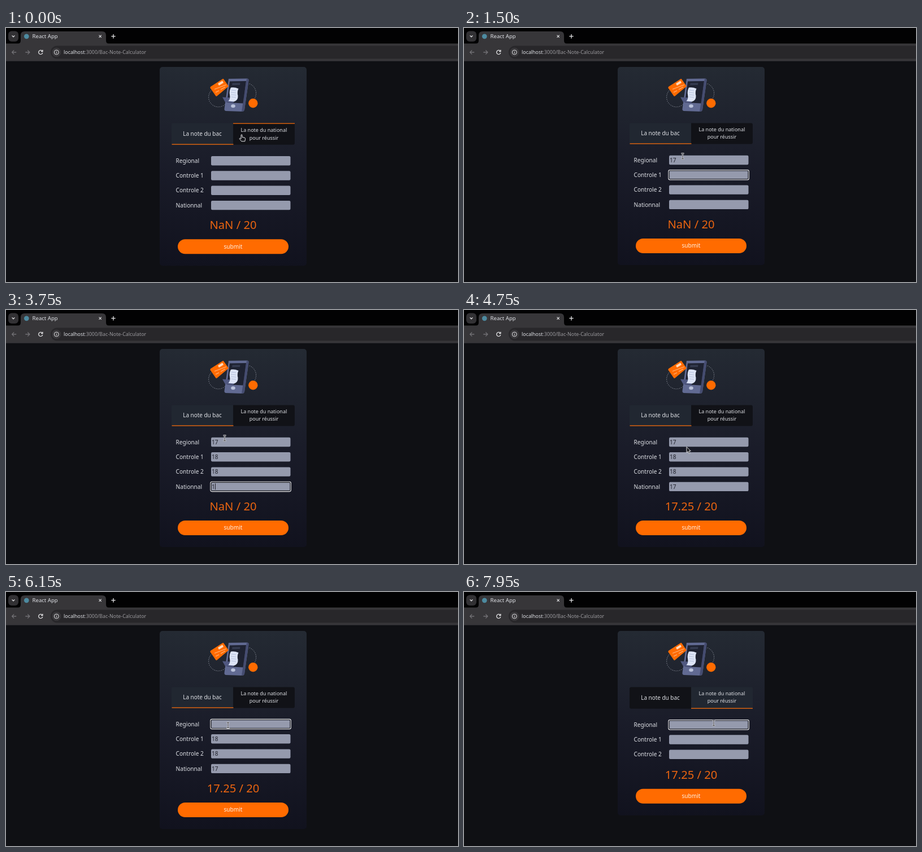
Write an HTML page that moves like this. It is 800 px wide and 450 px high and loops after 8 s.

```html
<!DOCTYPE html>
<html lang="fr">
<head>
<meta charset="utf-8">
<title>Bac Note Calculator</title>
<style>
  html, body { margin: 0; width: 100%; height: 100%; overflow: hidden; background: #0f1014; }
  svg { display: block; width: 100%; height: 100%; }
  text { font: 10.1px "Noto Sans", "Open Sans", sans-serif; fill: #dfe1e6; white-space: pre; }
  .mid { text-anchor: middle; }
  .small { font-size: 9px; }
  .line { fill: none; stroke-width: 1.3; }
  .cursor { fill: #17181c; stroke: #e4e4e8; stroke-width: 1; stroke-linejoin: round; }
</style>
</head>
<body>
<svg viewBox="0 0 800 450">
  <defs>
    <linearGradient id="cardFill" x2="0" y2="1">
      <stop stop-color="#242a33"/>
      <stop offset=".5" stop-color="#1a1c29"/>
      <stop offset="1" stop-color="#11121e"/>
    </linearGradient>
  </defs>
  <rect width="800" height="450" fill="#0f1014"/>

  <!-- browser bar -->
  <rect width="800" height="28" fill="#020203"/>
  <rect y="27.5" width="800" height="30" fill="#373639"/>
  <rect y="57.5" width="800" height="1" fill="#4a494c"/>
  <path d="M20 28Q26 28 26 22V13Q26 6 33 6H170Q177 6 177 13V22Q177 28 183 28Z" fill="#373639"/>
  <rect x="4" y="5.5" width="18" height="18.5" rx="6" fill="#323134"/>
  <g class="line" stroke="#e6e6e8">
    <path d="M10.6 13.4L13 15.8L15.4 13.4"/>
    <path d="M164.6 12.6L168.8 16.8M168.8 12.6L164.6 16.8" stroke-width="1.1"/>
    <path d="M190 11V18.4M186.3 14.7H193.7"/>
    <path d="M64 40.6A3.6 3.6 0 1 0 64.8 43.8M64.9 38.8V41.6H62"/>
  </g>
  <g class="line" stroke="#737276">
    <path d="M18.2 43H10.8M14.2 39.4L10.6 43L14.2 46.6"/>
    <path d="M34.3 43H41.7M38.3 39.4L41.9 43L38.3 46.6"/>
  </g>
  <circle cx="36.3" cy="14.8" r="4.4" fill="#4d8aa0"/>
  <text x="46.5" y="18" style="font-size:9.6px">React App</text>
  <rect x="79" y="31.5" width="740" height="23" rx="11.5" fill="#28272a"/>
  <circle cx="89.3" cy="43" r="8" fill="#39383b"/>
  <circle cx="89.3" cy="43" r="4" class="line" stroke="#dcdcdf" style="stroke-width:1"/>
  <path d="M89.3 42.4V45.2M89.3 40.6V41.5" class="line" stroke="#dcdcdf" style="stroke-width:1"/>
  <text x="102" y="46.2" style="font-size:8.85px">localhost<tspan fill="#9a999d">:3000/Bac-Note-Calculator</tspan></text>

  <rect id="card" x="272" y="69" width="260" height="351" rx="5" fill="url(#cardFill)"/>

  <!-- phone, receipt and payment card -->
  <g class="line" stroke="#c3c7d4" style="stroke-width:1;stroke-dasharray:1 2.2">
    <path d="M363 111A16.5 16.5 0 1 0 389 134"/>
    <path d="M428 98A18 18 0 0 1 440 125"/>
  </g>
  <path d="M394 90L427 89.5Q430 90 429.5 93L422 145Q421 148 418 148L389 147Q386 146 386.5 143Z" fill="#616a92"/>
  <path d="M426 89.5Q430 90 429.5 93L422 145Q421 148 417 148Z" fill="#454c70"/>
  <path d="M396 94.5L425 94L419.5 133.5L391 132Z" fill="#1e2231"/>
  <path d="M400.5 97.5L414.5 97.2L414 101L400 101.2Z" fill="#343a4f"/>
  <path d="M383 122.5L405 124L402.5 132.3L388 131.5Z" fill="#505880"/>
  <path d="M398 105.5Q405 104.5 411.5 107.5Q408.5 113 410.5 120Q411 128 403.5 130.5L393.5 129.5Q397.5 126 396 118Q394.8 111 398 105.5Z" fill="#dde4f6"/>
  <path d="M399 110L407 111M398 114L407 115M398.5 118L407.5 119M399 122L407 123" class="line" stroke="#aab6d6" style="stroke-width:.8"/>
  <ellipse cx="402" cy="138.3" rx="3.8" ry="3" fill="#b9c1da"/>
  <path d="M362 104L383 90.4Q384.5 89.5 385.5 91L394 103.3L373.5 120.5Q372 121.5 371 120L361.3 106Z" fill="#ff6b00"/>
  <path d="M375 98.5L383 93.5L385 97L377 102Z" fill="#ffd9bb"/>
  <path d="M369 108.5L390 100.5M371 114L377 111M380 109L388 104.5" class="line" stroke="#ffb27a"/>
  <circle cx="437.3" cy="133.3" r="8.2" fill="#ff6b00"/>

  <!-- tabs -->
  <path id="tabBac"/>
  <path id="tabNational"/>
  <rect id="underline" width="109" height="1.3" fill="#f26a0c"/>
  <rect id="overline" width="109" height="1.3" y="168.5" fill="#f26a0c"/>
  <text id="bacLabel" class="mid" x="347.5" style="font-size:9.95px">La note du bac</text>
  <g id="nationalLabel">
    <text class="mid small" x="456.4" y="183">La note du national</text>
    <text class="mid small" x="456.4" y="196.4">pour réussir</text>
  </g>

  <!-- form -->
  <g id="form">
    <g id="rows"></g>
    <g id="ring" fill="none">
      <rect x="362" y="-8.6" width="142.2" height="17.2" rx="2.4" stroke="#f0f0f3" stroke-width="1.3"/>
      <rect x="363.1" y="-7.5" width="140" height="15" rx="1.5" stroke="#101116" stroke-width="1.1"/>
    </g>
    <rect id="caret" width=".9" height="11" y="-5.6" fill="#15161c"/>
    <g id="footer">
      <text id="result" class="mid" x="402" y="354.8" style="font-size:20.2px;fill:#ec6510"></text>
      <rect x="304" y="373" width="196" height="26" rx="13" fill="#ff6b00"/>
      <text class="mid" x="402" y="389.4" style="fill:#fff0e4">submit</text>
    </g>
  </g>

  <!-- pointers, each with its hot spot at 0,0 -->
  <path id="arrow" class="cursor" d="M0 0V10.2L2.4 8L4.1 11.9L5.9 11.1L4.2 7.3H7.3Z"/>
  <path id="hand" class="cursor" d="M-1 -.6Q0 -1.6 1 -.6V3.4L5 4.2Q6.8 4.8 6.6 6.4L5.8 10.8H-.2L-3.8 6.4Q-4 5 -2.6 5.2L-1 6.4Z"/>
  <g id="beam" class="line">
    <path d="M-2.4 -4.8H2.4M0 -4.8V4.8M-2.4 4.8H2.4" stroke="#eeeef2" style="stroke-width:2.4"/>
    <path d="M-2.2 -4.8H2.2M0 -4.8V4.8M-2.2 4.8H2.2" stroke="#24252c" style="stroke-width:1"/>
  </g>
</svg>
<script>
const LOOP = 8000, STEP = 50, ROW_GAP = 26.3, FIRST_ROW = 234;
const SWITCH_TAB = 7750, SUBMIT = 4400;
const $ = id => document.getElementById(id);
const rowY = i => FIRST_ROW + ROW_GAP * i;

// Pointer path: time, x, y
const path = [
  [0, 417, 190], [150, 413, 195], [400, 397, 213], [750, 387, 227], [4000, 387, 227],
  [4350, 401, 384], [4450, 401, 384], [4750, 394, 242.5], [4850, 394, 242.5],
  [5050, 396, 236], [5200, 396, 236], [5600, 385, 235], [6000, 393, 236],
  [6200, 393, 236], [6600, 398, 234], [6750, 398, 234], [7250, 462, 160],
  [7400, 462, 160], [7600, 465, 166.5], [7750, 459, 182], [7950, 442, 232], [8000, 442, 232]
];

// Focused row over time, -1 for none
const focus = [[0, -1], [850, 0], [1500, 1], [2250, 2], [3250, 3], [SUBMIT, -1],
  [5650, 0], [7650, -1], [7900, 0]];

// Content of each field over time
const typed = [
  [[0, ''], [1050, '1'], [1250, '17'], [5850, '1'], [5950, '']],
  [[0, ''], [1750, '1'], [2000, '18']],
  [[0, ''], [2500, '1'], [2700, '18']],
  [[0, ''], [3750, '1'], [3850, '17']]
];

const latest = (list, t) => list.filter(e => e[0] <= t).pop();

function pointer(t) {
  const i = path.findIndex(p => p[0] > t);
  const [t0, x0, y0] = path[i - 1], [t1, x1, y1] = path[i];
  const u = (t - t0) / (t1 - t0), k = u * u * (3 - 2 * u);
  return [x0 + (x1 - x0) * k, y0 + (y1 - y0) * k];
}

const inside = (x, y, x0, y0, x1, y1) => x >= x0 && x <= x1 && y >= y0 && y <= y1;
const show = (el, on) => el.style.display = on ? '' : 'none';
const move = (el, x, y) => el.setAttribute('transform', `translate(${x} ${y})`);
const set = (el, attrs) => Object.entries(attrs).forEach(([k, v]) => el.setAttribute(k, v));

$('rows').innerHTML = ['Regional', 'Controle 1', 'Controle 2', 'Nationnal'].map((name, i) =>
  `<g transform="translate(0 ${rowY(i)})">
    <text x="300.6" y="3.6">${name}</text>
    <rect x="363" y="-8.2" width="140.5" height="16.4" rx="2.2" fill="#959aad"/>
    <text class="value" x="364" y="3.8" style="fill:#20212b"></text>
  </g>`).join('');
const rows = [...$('rows').children];
const values = rows.map(r => r.querySelector('.value'));

function draw(t) {
  const [x, y] = pointer(t);
  const national = t >= SWITCH_TAB;
  const overTab = inside(x, y, 293, 168.5, 511, 206);
  const hover = overTab && !national;
  const shift = hover || national ? 1.2 : 0;
  const lift = national ? ROW_GAP - .9 : 0;
  const bottom = 205.5 + shift;

  $('card').setAttribute('height', 351 + shift - lift);
  set($('tabBac'), {
    d: `M402 168.5H296Q293 168.5 293 171.5V${bottom - 3}Q293 ${bottom} 296 ${bottom}H402Z`,
    fill: national ? '#111217' : '#212731'
  });
  set($('tabNational'), {
    d: `M402 168.5H508Q511 168.5 511 171.5V${bottom - 3}Q511 ${bottom} 508 ${bottom}H402Z`,
    fill: national ? '#212731' : '#111217'
  });
  set($('underline'), { x: national ? 402 : 293.5, y: bottom - 1.2 });
  $('overline').setAttribute('x', x < 402 ? 293 : 402);
  show($('overline'), hover);
  $('bacLabel').setAttribute('y', 190 + shift * .7);
  move($('nationalLabel'), 0, hover ? 1.2 : 0);

  move($('form'), 0, shift);
  move($('footer'), 0, -lift);
  show(rows[3], !national);
  typed.forEach((list, i) => values[i].textContent = national ? '' : latest(list, t)[1]);
  $('result').textContent = t < SUBMIT ? 'NaN / 20' : '17.25 / 20';

  const [since, row] = latest(focus, t);
  show($('ring'), row >= 0);
  show($('caret'), false);
  if (row >= 0) {
    move($('ring'), 0, rowY(row));
    const [keyTime] = latest(typed[row], t);
    const length = values[row].textContent.length;
    const blink = (t - Math.max(since, keyTime)) % 1000 < 500;
    show($('caret'), length && blink);
    move($('caret'), 364.2 + 5.78 * length, rowY(row));
  }

  const overField = [0, 1, 2, 3].some(i =>
    !(national && i === 3) && Math.abs(y - shift - rowY(i)) < 8.3 && x > 363 && x < 503);
  const overButton = inside(x, y, 304, 373 - lift, 500, 399 - lift);
  const kind = overField ? 'beam' : overTab || overButton ? 'hand' : 'arrow';
  for (const id of ['arrow', 'hand', 'beam']) show($(id), id === kind);
  move($(kind), x, y);
}

const start = performance.now();
function tick() {
  const t = (performance.now() - start) % LOOP;
  draw(Math.floor(t / STEP) * STEP);
  requestAnimationFrame(tick);
}
tick();
</script>
</body>
</html>
```
